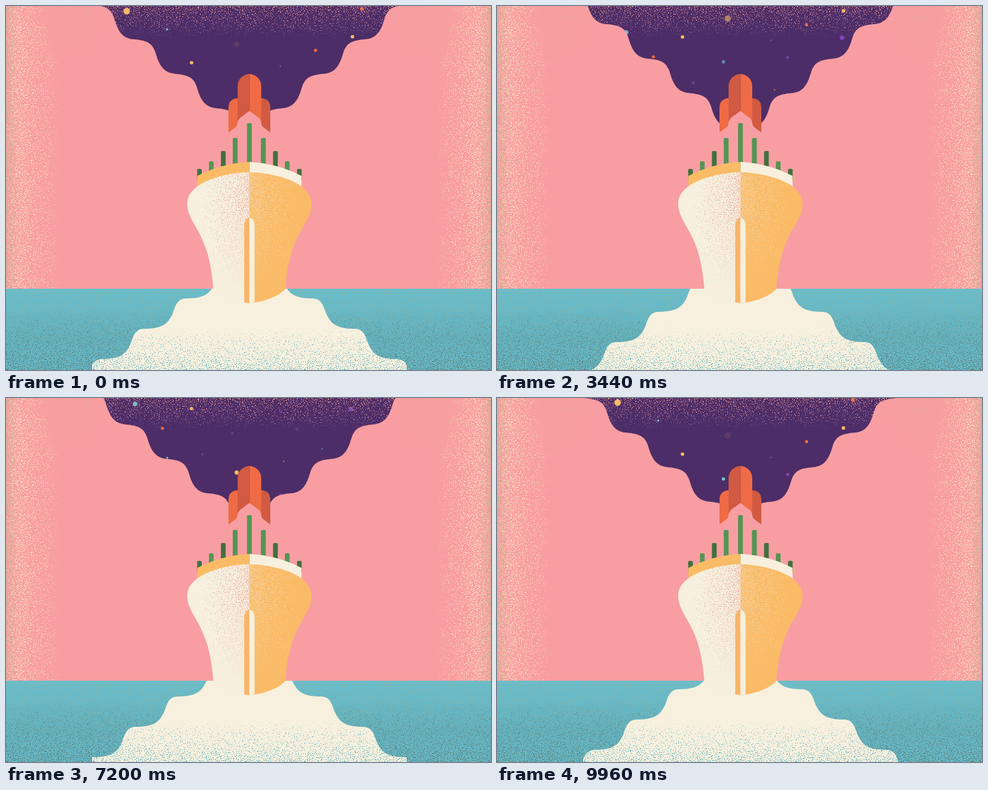
An HTML page without scripts for the animation above (10000 ms loop, 800 by 600 pixels).

```html
<!DOCTYPE html>
<html lang="en">
<head>
<meta charset="utf-8">
<title>Steamship</title>
<style>
  html, body { margin: 0; width: 100%; height: 100%; overflow: hidden; background: #f89ea2; }
  svg { display: block; width: 100%; height: 100%; }
  .grain { filter: url(#grain); }
  .gold { fill: #fabb66; }
  .cream { fill: #f7f0de; }
  .orange { fill: #ee6b45; }
  .rust { fill: #d25a42; }
  .cyan { fill: #6ec3d8; }
  .violet { fill: #8148ba; }
  .leaf { fill: #559455; }
  .pine { fill: #41703f; }
  .glow, .late, .flare, .dim, .fade, .pop, .shrink, .comet { animation: 5s linear infinite; }
  .flare, .pop, .shrink { transform-box: fill-box; transform-origin: center; }
  .glow { animation-name: glow; }
  .late { animation-name: late; }
  .flare { animation-name: flare; }
  .dim { animation-name: dim; }
  .fade { animation-name: fade; }
  .pop { animation-name: pop; }
  .shrink { animation-name: shrink; }
  .comet { animation-name: comet; }
  @keyframes glow { 0% { opacity: .15 } 26% { opacity: .3 } 46% { opacity: .5 } 66% { opacity: .75 } 92%, to { opacity: 1 } }
  @keyframes late { 0%, 46% { opacity: .15 } 66% { opacity: .6 } 92%, to { opacity: 1 } }
  @keyframes flare { 0% { opacity: .1 } 20% { opacity: .7; transform: none } 46%, to { opacity: 1; transform: scale(.75) } }
  @keyframes dim { 0%, 50% { opacity: 1 } 66% { opacity: .65 } 92%, to { opacity: .1 } }
  @keyframes fade { 0%, 80% { opacity: .8 } 92% { opacity: .5 } to { opacity: .2 } }
  @keyframes pop { 0% { transform: scale(0) } 20% { transform: scale(.9) } 26% { transform: scale(1) } 46%, to { transform: scale(.28) } }
  @keyframes shrink { 0% { transform: scale(1) } 20%, to { transform: scale(.2) } }
  @keyframes comet {
    0%, 23.9% { transform: translate(205px, 84px); opacity: 0 }
    24% { transform: translate(205px, 84px); opacity: 1 }
    26.4% { transform: translate(254px, 70px); opacity: 1 }
    31% { transform: translate(352px, 42px); opacity: 0 }
    to { transform: translate(352px, 42px); opacity: 0 }
  }
</style>
</head>
<body>
<svg viewBox="0 0 800 600" preserveAspectRatio="none">
  <defs>
    <!-- Turns a translucent fill into solid specks whose density follows its alpha. -->
    <filter id="grain" x="0" y="0" width="1" height="1" color-interpolation-filters="sRGB">
      <feTurbulence type="fractalNoise" baseFrequency=".618" numOctaves="3" seed="7"/>
      <feColorMatrix values="0 0 0 0 0  0 0 0 0 0  0 0 0 0 0  0 0 0 2.1 -.55" result="noise"/>
      <feComposite in="SourceAlpha" in2="noise" operator="arithmetic" k2="10" k3="10" k4="-10" result="specks"/>
      <feComponentTransfer in="SourceGraphic"><feFuncA type="linear" slope="255"/></feComponentTransfer>
      <feComposite in2="specks" operator="in"/>
    </filter>

    <linearGradient id="sideCream">
      <stop stop-color="#f8e2bb" stop-opacity=".48"/>
      <stop offset=".4" stop-color="#f8e2bb" stop-opacity=".3"/>
      <stop offset="1" stop-color="#f8e2bb" stop-opacity="0"/>
    </linearGradient>
    <linearGradient id="sideOlive">
      <stop stop-color="#bdb088" stop-opacity=".46"/>
      <stop offset="1" stop-color="#bdb088" stop-opacity="0"/>
    </linearGradient>
    <radialGradient id="corner">
      <stop stop-color="#dfb295" stop-opacity=".22"/>
      <stop offset="1" stop-color="#dfb295" stop-opacity="0"/>
    </radialGradient>
    <linearGradient id="topPink" x2="0" y2="1">
      <stop stop-color="#f0a08f" stop-opacity=".28"/>
      <stop offset=".5" stop-color="#e79aa0" stop-opacity=".16"/>
      <stop offset="1" stop-color="#e79aa0" stop-opacity="0"/>
    </linearGradient>
    <linearGradient id="topMauve" x2="0" y2="1">
      <stop stop-color="#80609a" stop-opacity=".2"/>
      <stop offset=".6" stop-color="#80609a" stop-opacity=".18"/>
      <stop offset="1" stop-color="#80609a" stop-opacity="0"/>
    </linearGradient>
    <linearGradient id="seaFill" x2="0" y2="1">
      <stop stop-color="#66bfd1"/>
      <stop offset=".6" stop-color="#64b1bc"/>
      <stop offset="1" stop-color="#66bbcb"/>
    </linearGradient>
    <linearGradient id="seaTan" x2="0" y2="1">
      <stop stop-color="#86b5ab" stop-opacity=".38"/>
      <stop offset="1" stop-color="#7aaea8" stop-opacity=".15"/>
    </linearGradient>
    <linearGradient id="seaDark" x2="0" y2="1">
      <stop offset=".25" stop-color="#5f8582" stop-opacity="0"/>
      <stop offset="1" stop-color="#5f8582" stop-opacity=".44"/>
    </linearGradient>
    <linearGradient id="spray" x2="0" y2="1">
      <stop stop-color="#66b5c2" stop-opacity="0"/>
      <stop offset=".5" stop-color="#66b5c2" stop-opacity=".16"/>
      <stop offset="1" stop-color="#66b5c2" stop-opacity=".32"/>
    </linearGradient>
    <linearGradient id="hullPink">
      <stop stop-color="#eab9ab" stop-opacity=".48"/>
      <stop offset=".85" stop-color="#eab9ab" stop-opacity="0"/>
    </linearGradient>
    <linearGradient id="hullPale">
      <stop stop-color="#f3d3a8" stop-opacity=".5"/>
      <stop offset=".9" stop-color="#f3d3a8" stop-opacity="0"/>
    </linearGradient>
    <linearGradient id="down" x2="0" y2="1">
      <stop offset=".3" stop-color="#fff"/>
      <stop offset=".95" stop-color="#fff" stop-opacity="0"/>
    </linearGradient>
    <mask id="fadeDown"><rect x="290" y="265" width="225" height="230" fill="url(#down)"/></mask>

    <clipPath id="left"><path d="M0 0H402V600H0Z"/></clipPath>

    <mask id="smoke" maskUnits="userSpaceOnUse" x="0" y="0" width="800" height="260">
      <g id="smokeHalf" clip-path="url(#left)">
        <path fill="#fff" d="M109.600 -38.600
          c5 16 10 35 32.500 36.700 22 2 30.200 6 35.700 20.100
          c5 16 10 35 32.500 36.700 22 2 30.200 6 35.700 20.100
          c5 16 10 35 32.500 36.700 22 2 30.200 6 35.700 20.100
          c5 16 10 35 32.500 36.700 22 2 30.200 6 35.700 20.100
          c5 16 10 35 32.500 36.700 22 2 30.200 6 35.700 20.100
          H480V-39Z">
          <animateTransform attributeName="transform" type="translate" from="0 0" to="-68.200 -56.800" dur="1s" repeatCount="indefinite"/>
        </path>
      </g>
      <use href="#smokeHalf" transform="matrix(-1 0 0 1 803 0)"/>
    </mask>

    <mask id="wake" maskUnits="userSpaceOnUse" x="142" y="466" width="519" height="134">
      <g id="wakeHalf" clip-path="url(#left)">
        <path fill="#fff" d="M414 407
          c-8 16 -15 25 -48 25 -13 1 -16 9 -21.500 25
          c-8 16 -15 25 -48 25 -13 1 -16 9 -21.500 25
          c-8 16 -15 25 -48 25 -13 1 -16 9 -21.500 25
          c-8 16 -15 25 -48 25 -13 1 -16 9 -21.500 25
          H480V407Z">
          <animateTransform attributeName="transform" type="translate" from="0 0" to="-69.500 50" dur="1s" repeatCount="indefinite"/>
        </path>
      </g>
      <use href="#wakeHalf" transform="matrix(-1 0 0 1 803 0)"/>
    </mask>

    <path id="hull" d="M401.500 274C445 275 504 291 504 326C504 361 467 371 461 466C452 477 430 487 401.500 490Z"/>
    <path id="deck" d="M401.500 257Q446 259 487.500 280V298L401.500 276Z"/>
    <path id="bow" d="M401.500 348Q409.500 353 410 360V488.500L401.500 490Z"/>
    <path id="body" d="M401.500 112A20 20 0 0 1 421 132V192Q420 187 416 183.500L401.500 173Z"/>
    <path id="fin" d="M421 152Q436 153 436 168V208.500L424 199.500Q421 197 421 191Z"/>
    <g id="edge">
      <rect class="grain" width="92" height="466" fill="url(#sideCream)"/>
      <rect class="grain" width="24" height="466" fill="url(#sideOlive)"/>
      <ellipse class="grain" cx="100" cy="20" rx="75" ry="75" fill="url(#corner)"/>
    </g>
  </defs>

  <rect width="800" height="600" fill="#f89ea2"/>
  <use href="#edge"/>
  <use href="#edge" transform="matrix(-1 0 0 1 800 0)"/>

  <g mask="url(#smoke)">
    <rect width="800" height="260" fill="#4d2d67"/>
    <g>
      <g id="steady">
        <circle class="cyan" cx="266" cy="38.500" r="1.700"/>
        <circle class="gold" cx="306" cy="93.500" r="2.800"/>
        <circle class="violet" cx="452.500" cy="99" r="1.600" opacity=".8"/>
        <circle class="orange" cx="510.500" cy="73" r="2.600"/>
        <circle class="gold" cx="571.500" cy="50.500" r="2.900"/>
        <circle class="orange" cx="587" cy="4.500" r="3.100"/>
      </g>
      <use href="#steady" y="-136"/>
      <circle class="gold shrink" cx="199" cy="8.500" r="5.400"/>
      <circle class="gold" cx="199" cy="-127.500" r="5.400"/>
      <circle class="gold flare" cx="380.500" cy="63" r="4.600"/>
      <circle class="gold dim" cx="380.500" cy="-73" r="5.300"/>
      <circle class="violet glow" cx="324" cy="33" r="2.300"/>
      <circle class="violet fade" cx="324" cy="-103" r="2.300"/>
      <circle class="cyan late" cx="373.500" cy="-1.500" r="2.700"/>
      <circle class="violet glow" cx="479.500" cy="-9" r="2.500"/>
      <circle class="orange" cx="258" cy="-10" r="2.600"/>
      <circle class="cyan" cx="213" cy="-50" r="3.700"/>
      <circle class="violet" cx="569" cy="-41.500" r="3.700"/>
      <circle class="cyan pop" cx="521.500" cy="24" r="3"/>
      <circle class="gold flare" cx="458" cy="44.500" r="1.300"/>
      <animateTransform attributeName="transform" type="translate" from="0 0" to="0 136" dur="5s" repeatCount="indefinite"/>
    </g>
    <path class="cream comet" d="M0 -1Q-12 0 -24 7Q-10 6 0 2Q2 0 0 -1Z"/>
    <rect class="grain" x="130" width="540" height="54" fill="url(#topMauve)"/>
    <rect class="grain" x="130" width="540" height="46" fill="url(#topPink)"/>
  </g>

  <rect y="466" width="800" height="134" fill="url(#seaFill)"/>
  <rect class="grain" y="466" width="800" height="134" fill="url(#seaTan)"/>
  <rect class="grain" y="466" width="800" height="134" fill="url(#seaDark)"/>

  <g mask="url(#wake)">
    <rect class="cream" x="142" y="466" width="519" height="134"/>
    <rect class="grain" x="142" y="530" width="519" height="70" fill="url(#spray)"/>
  </g>

  <!-- Open sky beneath the rocket -->
  <path fill="#f89ea2" d="M367 208L381 195V188L401.500 172L422 188V195L436 208V262H367Z"/>
  <use href="#fin" class="rust"/>
  <use href="#body" class="orange"/>
  <g transform="matrix(-1 0 0 1 803 0)">
    <use href="#fin" class="orange"/>
    <use href="#body" class="rust"/>
  </g>

  <g class="leaf">
    <rect x="397.500" y="193" width="8" height="80" rx="2"/>
    <rect x="374" y="217.500" width="8" height="60" rx="2"/>
    <rect x="420.500" y="217.500" width="8" height="60" rx="2"/>
    <rect x="334.700" y="256" width="7.800" height="30" rx="2"/>
    <rect x="460" y="256" width="7.800" height="30" rx="2"/>
  </g>
  <g class="pine">
    <rect x="354.500" y="239" width="7.800" height="40" rx="2"/>
    <rect x="440.500" y="239" width="7.800" height="40" rx="2"/>
    <rect x="315.300" y="268.500" width="7.700" height="20" rx="2"/>
    <rect x="480" y="268.500" width="7.700" height="20" rx="2"/>
  </g>

  <use href="#deck" class="cream"/>
  <use href="#hull" class="gold"/>
  <g mask="url(#fadeDown)"><use href="#hull" class="grain" fill="url(#hullPale)"/></g>
  <g transform="matrix(-1 0 0 1 803 0)">
    <use href="#deck" class="gold"/>
    <use href="#hull" class="cream"/>
    <g mask="url(#fadeDown)"><use href="#hull" class="grain" fill="url(#hullPink)"/></g>
    <use href="#bow" fill="#f9b46a"/>
  </g>
  <use href="#bow" class="cream"/>
</svg>
</body>
</html>
```
